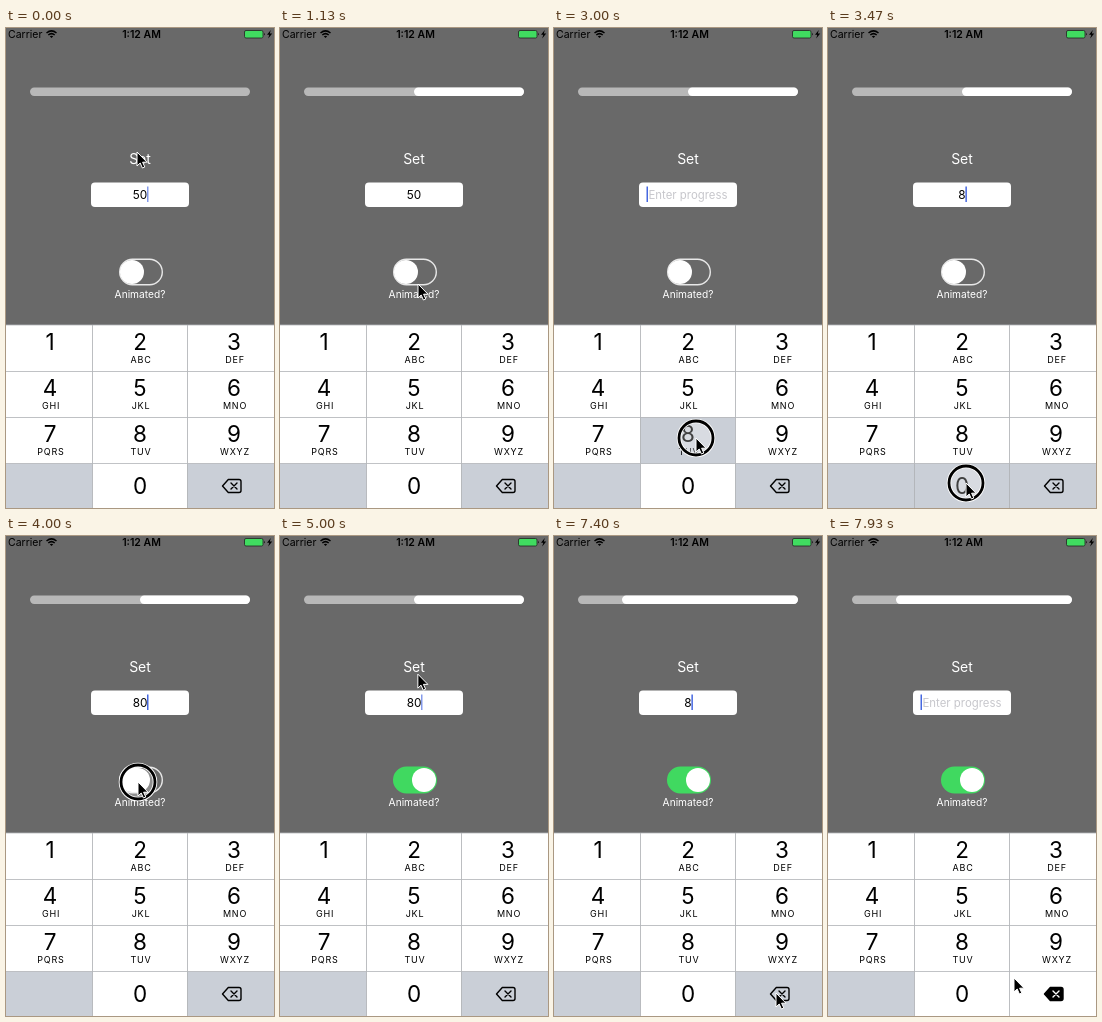
Recreate the animation shown at these times as an HTML page. Size 268 by 480 pixels, loop 8 s.

```html
<!DOCTYPE html>
<html lang="en">
<head>
<meta charset="utf-8">
<title>Progress bar demo</title>
<style>
  html, body { margin: 0; width: 100%; height: 100%; overflow: hidden; background: #696969; }
  svg { display: block; width: 100vw; height: 100vh; }
  text { font-family: Inter, Roboto, sans-serif; text-anchor: middle; }
  .digit { font-size: 22.5px; }
  .letters { font-size: 9px; letter-spacing: .8px; }
</style>
</head>
<body>
<svg viewBox="0 0 268 480">
  <rect width="268" height="480" fill="#696969"/>

  <g id="status">
    <text x="2" y="10" font-size="10.5" style="text-anchor:start">Carrier</text>
    <g fill="none" stroke="#000" stroke-width="1.5">
      <path d="M40.5 5Q45.5 .8 50.5 5M42.3 7Q45.5 4.2 48.7 7"/>
      <path d="M43.8 8.3Q45.5 7 47.2 8.3L45.5 10Z" fill="#000" stroke="none"/>
    </g>
    <text x="135.5" y="10" font-size="10.5" font-weight="600">1:12 AM</text>
    <rect x="238.5" y="2.5" width="18.5" height="7.5" rx="1.5" fill="#40dc60" stroke="#222" stroke-width=".8"/>
    <path d="M258 4.8q1.6 1.4 0 2.8z"/>
    <path d="M264.8 2L261 6.8H263.3L262.2 10.4L266.2 5.4H263.8Z"/>
  </g>

  <rect x="24" y="59.5" width="220" height="8.5" rx="4.2" fill="#b8b8b8"/>
  <rect id="bar" y="59.5" height="8.5" rx="4.2" fill="#fff"/>

  <text id="setButton" x="134" y="136" font-size="14" fill="#fff">Set</text>

  <rect x="85" y="154.5" width="98" height="24.5" rx="4" fill="#fff"/>
  <text id="value" x="134" y="171" font-size="11.8"></text>
  <text id="placeholder" x="134" y="171" font-size="11.4" fill="#c7c7cc">Enter progress</text>
  <rect id="caret" y="158.5" width="1.5" height="15.5" fill="#4668e0"/>

  <rect id="switchTrack" x="113.7" y="231.2" width="42.6" height="25.6" rx="12.8" stroke-width="1.4"/>
  <rect id="knob" y="232" height="24" rx="12" fill="#fff"/>
  <text x="134" y="270" font-size="10.2" fill="#fff">Animated?</text>

  <g id="keys"></g>
  <path d="M0 297H268M0 343.5H268M0 389.5H268M0 435.5H268M86.5 297V480M181.5 297V480" stroke="#b4b6ba" stroke-width=".8"/>

  <g id="backspace" stroke="#000" stroke-width="1.4" stroke-linejoin="round">
    <path id="backspaceBody" d="M216.5 458L222.3 451.5H233Q235 451.5 235 453.5V462.5Q235 464.5 233 464.5H222.3Z"/>
    <path id="backspaceCross" d="M225 455L231 461M231 455L225 461" stroke-linecap="round"/>
  </g>

  <g id="pointer">
    <g id="ring" fill="none">
      <circle r="17" fill="#fff" fill-opacity=".25" stroke="#fff" stroke-width="4.6"/>
      <circle r="17" stroke="#000" stroke-width="2.8"/>
    </g>
    <path d="M0 0V14L3.2 11L5.4 16L7.8 15L5.6 10.2H10Z" stroke="#fff" stroke-width="1"/>
  </g>
</svg>

<script>
const LOOP = 8000;
const $ = id => document.getElementById(id);
const set = (id, attrs) => {
  for (const name in attrs) $(id).setAttribute(name, attrs[name]);
};
const clamp = x => Math.min(1, Math.max(0, x));
const mix = (a, b, k) => a + (b - a) * k;
const ease = (t, from, to) => {
  const k = clamp((t - from) / (to - from));
  return k * k * (3 - 2 * k);
};
const within = (t, spans) => spans.some(([from, to]) => t >= from && t < to);

// Keypad
const columns = [[0, 86.5, 44], [86.5, 95, 134], [181.5, 86.5, 228]];
const letters = ['', 'ABC', 'DEF', 'GHI', 'JKL', 'MNO', 'PQRS', 'TUV', 'WXYZ'];
const labels = ['1', '2', '3', '4', '5', '6', '7', '8', '9', '', '0', 'back'];
const GREY = '#cacfd7';
$('keys').innerHTML = labels.map((label, i) => {
  const [x, width, center] = columns[i % 3];
  const row = Math.floor(i / 3);
  const top = 297 + row * 46.2;
  const fill = label === '' || label === 'back' ? GREY : '#fff';
  const digit = label === 'back' ? '' : label;
  return `<rect id="key${label}" x="${x}" y="${top}" width="${width}" height="46.5" fill="${fill}"/>
    <text class="digit" x="${center}" y="${row === 3 ? 466 : 322 + row * 46}">${digit}</text>
    <text class="letters" x="${center + 1}" y="${335 + row * 46}">${letters[i] || ''}</text>`;
}).join('');

// Pointer stops: time, x, y
const stops = [
  [0, 131, 124], [550, 131, 124], [1130, 138, 256], [1700, 222, 457], [2350, 222, 457],
  [2850, 142, 410], [3080, 142, 410], [3330, 138, 455], [3600, 138, 455], [3900, 132, 246],
  [4300, 132, 246], [4950, 138, 139], [5250, 136, 128], [6400, 136, 128], [6730, 157, 455],
  [6870, 157, 455], [7070, 222, 457], [7670, 222, 457], [7930, 186, 442], [LOOP, 180, 439]
];
const pressSet = [[200, 350], [5330, 5500]];
const pressBack = [[1850, 2000], [2150, 2300], [7150, 7300], [7450, 7620]];
const press8 = [[2880, 3060]];
const press0 = [[3400, 3570]];
const pressSwitch = [[3930, 4130]];
const presses = [...pressSet, ...pressBack, ...press8, ...press0, ...pressSwitch];

// Field contents: time of edit, text
const edits = [[0, '50'], [1900, '5'], [2200, ''], [3060, '8'], [3560, '80'], [7200, '8'], [7500, '']];

function pointerAt(t) {
  const i = stops.findIndex(stop => stop[0] > t);
  const [a, b] = [stops[i - 1], stops[i]];
  const k = ease(t, a[0], b[0]);
  return [mix(a[1], b[1], k), mix(a[2], b[2], k)];
}

function caretOpacity(t, lastEdit) {
  if (lastEdit > 0 && t - lastEdit < 900) return 1;
  const phase = t % 1000;
  return phase < 500 ? clamp((80 - phase) / 120) : clamp((phase - 500) / 100) * clamp((1080 - phase) / 120);
}

function draw(t) {
  const progress = t < 350 ? 0 : mix(50, 80, ease(t, 5480, 6130));
  const width = progress * 2.2;
  set('bar', { x: 244 - width, width });

  const lastSet = pressSet.filter(([from]) => from <= t).pop();
  const dim = lastSet ? 1 - ease(t, lastSet[1], lastSet[1] + 300) : 0;
  set('setButton', { opacity: 1 - .75 * dim });

  const [lastEdit, value] = edits.filter(([time]) => time <= t).pop();
  $('value').textContent = value;
  set('placeholder', { visibility: value ? 'hidden' : 'visible' });
  set('caret', {
    x: value ? 133.8 + value.length * 3.6 : 92.5,
    opacity: caretOpacity(t, lastEdit)
  });

  const on = ease(t, 4150, 4450);
  const stretch = 6 * ease(t, 3930, 4000) * (1 - ease(t, 4150, 4350));
  set('knob', { x: mix(114, 132, on), width: 24 + stretch });
  set('switchTrack', {
    fill: `rgba(64,217,96,${on})`,
    stroke: `rgb(${mix(232, 64, on)},${mix(232, 217, on)},${mix(232, 96, on)})`
  });

  const backDown = within(t, pressBack) || t >= 7450;
  set('key8', { fill: within(t, press8) ? GREY : '#fff' });
  set('key0', { fill: within(t, press0) ? GREY : '#fff' });
  set('keyback', { fill: backDown ? '#fff' : GREY });
  set('backspaceBody', { fill: backDown ? '#000' : 'none' });
  set('backspaceCross', { stroke: backDown ? '#fff' : '#000' });

  set('pointer', { transform: `translate(${pointerAt(t)})` });
  set('ring', { visibility: within(t, presses) ? 'visible' : 'hidden' });
}

function tick() {
  draw(performance.now() % LOOP);
  requestAnimationFrame(tick);
}
tick();
</script>
</body>
</html>
```
